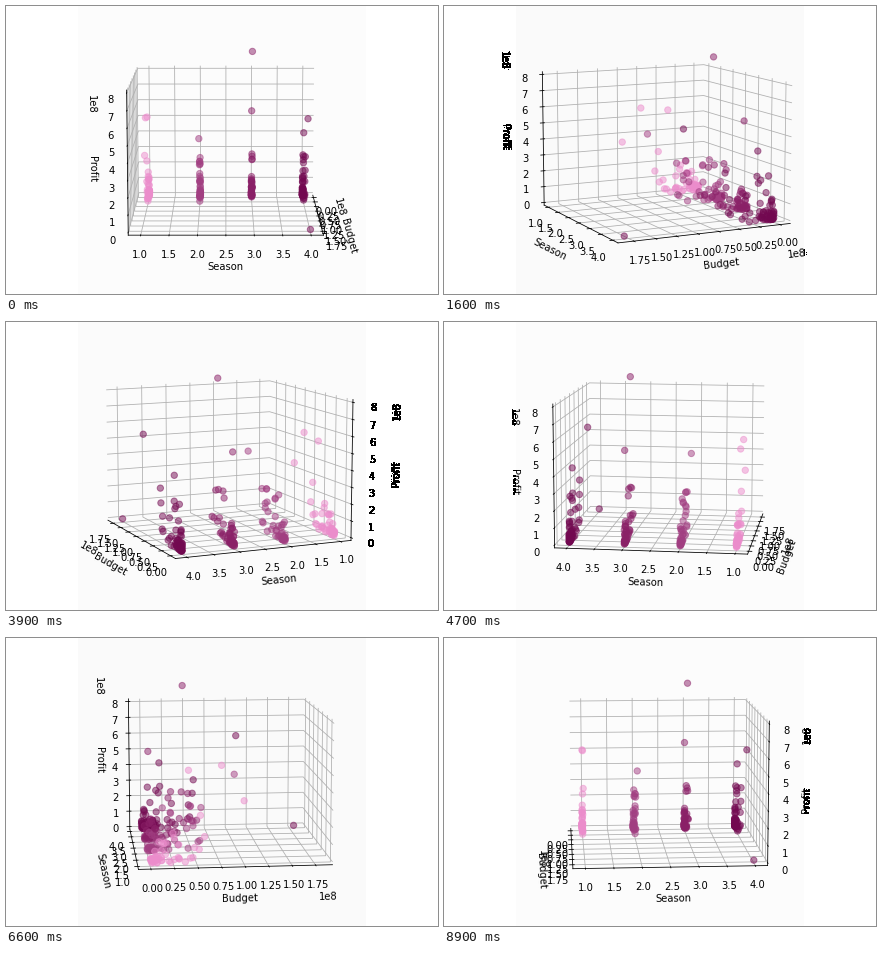
These frames come from a looping animation (432x288 px, 9 s). A matplotlib script:

```python
import matplotlib.pyplot as plt
import numpy as np
from matplotlib.animation import FuncAnimation

STEPS, INTERVAL = 90, 100
UNIT = 1e8
COLORS = ['#eb8ccb', '#a13e81', '#8a2067', '#720850']

# The few isolated hits: budget, season, profit.
HITS = [(1.0, 1, 3.53), (.76, 1, 5.6), (.41, 1, 5.35), (.96, 2, 4.51),
        (.44, 3, 9.42), (.05, 3, 5.44), (1.8, 4, 0), (1.11, 4, 5.84),
        (.21, 4, 4.19), (.61, 4, 3.07)]


def season_points(season, rng):
    """A dense crowd of small titles plus a looser group of mid-sized ones."""
    crowd, mid = (52 if season == 4 else 36), 14
    budget = np.r_[rng.exponential(.08, crowd), rng.uniform(.04, .6, mid)]
    profit = np.r_[rng.exponential(.3, crowd), .2 + 2.8 * rng.random(mid) ** 1.5]
    return np.column_stack([budget, np.full(crowd + mid, season), profit])


def padded(lo, hi, margin=.05):
    """Limits with a data margin and 1/48 of view margin on each side."""
    half = (hi - lo) / 2 * (1 + 2 * margin) * 25 / 24
    mid = (lo + hi) / 2
    return mid - half, mid + half


def harden(img, dpi):
    """Give text beyond the panel hard edges; the points' own layer stays soft."""
    out = img.copy()
    if len(img) == int(fig.bbox.height):
        out[..., 3] = out[..., 3] > 0
    return out, 0, 0


rng = np.random.default_rng(4)
data = np.vstack([HITS] + [season_points(s, rng) for s in (1, 2, 3, 4)])
budget, season, profit = data.T

fig = plt.figure(figsize=(6, 4), dpi=72, facecolor='white')
ax = fig.add_axes([0, 0, 1, 1], projection='3d')
ax.set_agg_filter(harden)
ax.scatter(budget * UNIT, season, profit * UNIT,
           c=[COLORS[int(s) - 1] for s in season],
           s=40, alpha=.5, depthshade=False)

ax.set_xlim(padded(0, 1.8 * UNIT))
ax.set_ylim(padded(1, 4))
ax.set_zlim(padded(0, 8 * UNIT, margin=0))
ax.set_xlabel('Budget')
ax.set_ylabel('Season')
ax.set_zlabel('Profit')
for axis in (ax.xaxis, ax.yaxis, ax.zaxis):
    axis.set_pane_color((1, 1, 1, 0))


def update(i):
    azim = 360 * i / STEPS + .01
    a = np.radians(azim)
    # The panel darkens slightly as the side wall turns into view.
    shade = 254 - 1.6 * abs(np.cos(a)) - 3.5 * abs(np.sin(a))
    ax.set_facecolor((shade / 255,) * 3)
    ax.view_init(elev=10, azim=azim)
    return ax,


anim = FuncAnimation(fig, update, frames=STEPS, interval=INTERVAL,
                     init_func=lambda: update(0), repeat=True, repeat_delay=0)
plt.show()
```
